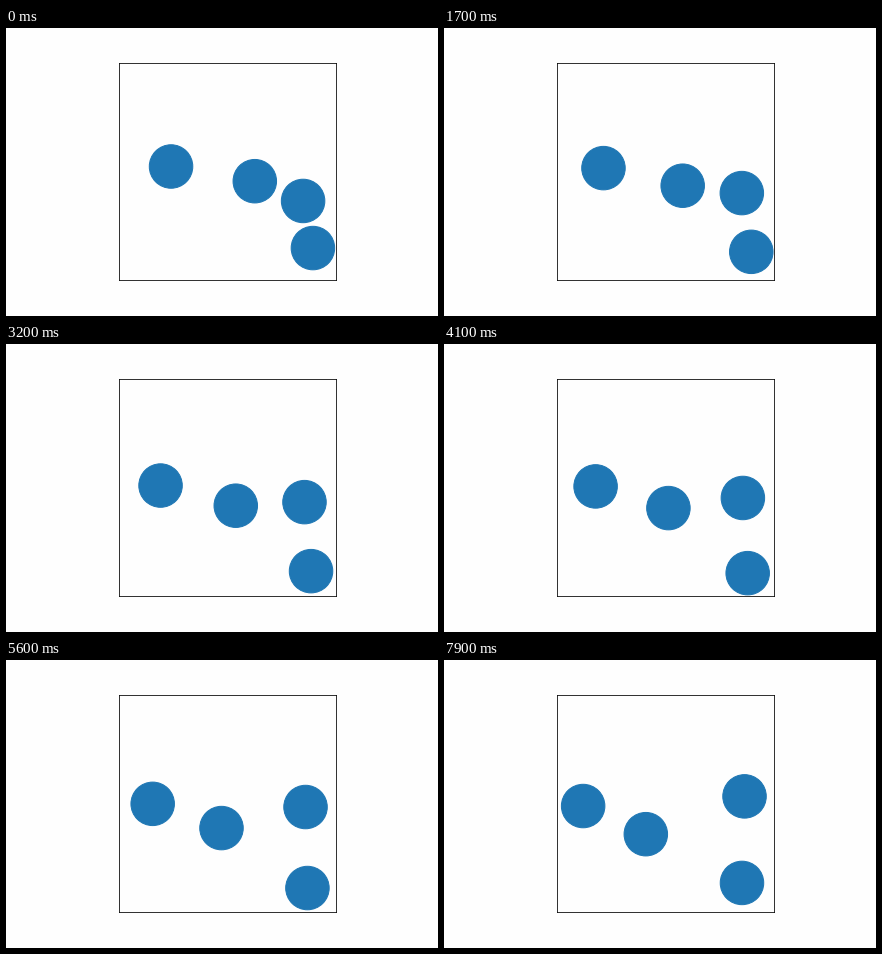
Recreate the animation shown at these times as a matplotlib script. Size 432x288 px, loop 8000 ms.

```python
import matplotlib.pyplot as plt
from matplotlib.animation import FuncAnimation
from matplotlib.patches import Circle

FRAMES, INTERVAL = 80, 100
RADIUS = 0.1
PAPER = "#fefefe"


def bounce(start, speed, step):
    """Coordinate moving at constant speed, reflected at both walls."""
    span = 1 - 2 * RADIUS
    travel = (start + speed * step - RADIUS) % (2 * span)
    return RADIUS + span - abs(span - travel)


class Ball:
    def __init__(self, ax, x, y, vx, vy):
        self.start, self.speed = (x, y), (vx, vy)
        self.disc = ax.add_patch(Circle((x, y), RADIUS, color="C0", lw=1))

    def move(self, step):
        self.disc.center = [bounce(p, v, step)
                            for p, v in zip(self.start, self.speed)]


fig, ax = plt.subplots(figsize=(6, 4), dpi=72, facecolor=PAPER)
fig.subplots_adjust(left=0.125, right=0.9, bottom=0.125, top=0.88)
ax.set(xlim=(0, 1), ylim=(0, 1), xticks=[], yticks=[],
       aspect="equal", facecolor=PAPER)

balls = [
    Ball(ax, x=0.2408, y=0.5220, vx=-0.001508, vy=-0.000439),
    Ball(ax, x=0.6260, y=0.4544, vx=-0.002735, vy=-0.001222),
    Ball(ax, x=0.8481, y=0.3635, vx=0.000200, vy=0.002130),
    Ball(ax, x=0.8933, y=0.1469, vx=0.000690, vy=-0.001020),
]


def update(step):
    for ball in balls:
        ball.move(step)
    return [ball.disc for ball in balls]


anim = FuncAnimation(fig, update, frames=FRAMES, interval=INTERVAL,
                     repeat=True, repeat_delay=0)
plt.show()
```
